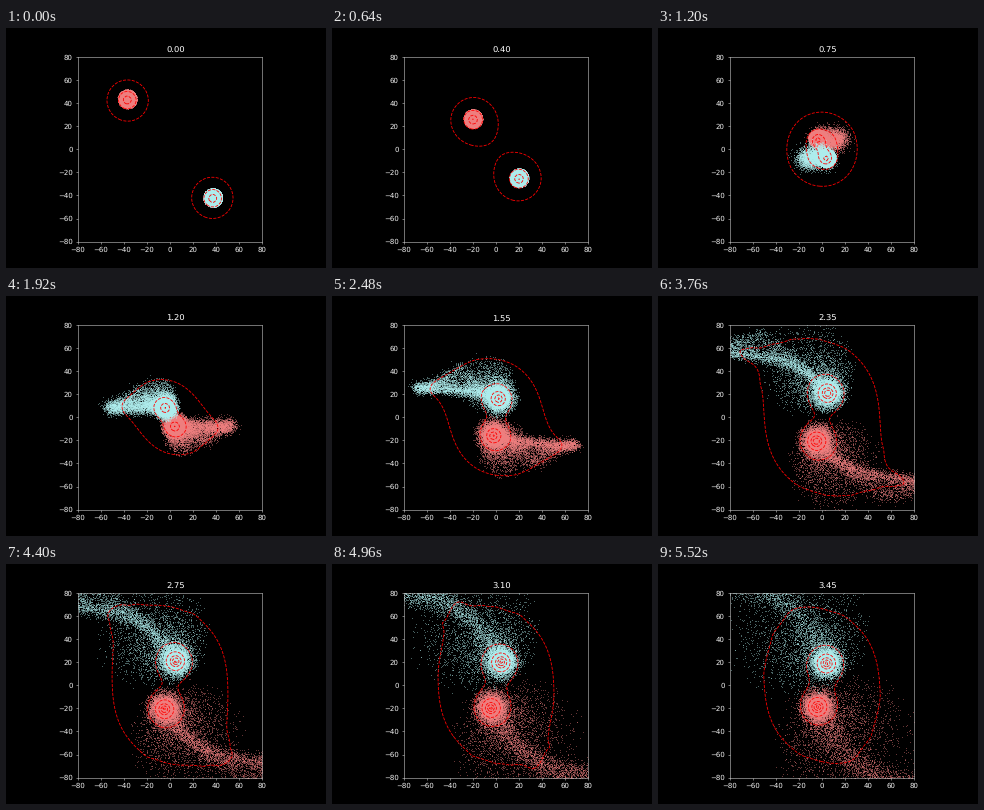
A matplotlib script that plays this animation: 320 px wide and 240 px high, repeating every 5600 ms.

```python
import numpy as np
import matplotlib.pyplot as plt
from matplotlib.animation import FuncAnimation

FRAMES, INTERVAL, DT = 70, 80, 0.05
COUNT = 16000
MEETING = 0.75  # time of the close encounter

# Path of the turquoise core; the coral galaxy mirrors it through the centre.
CORE_T = [0, 0.5, MEETING, 1.05, 1.55, 2.35, 3.45]
CORE = [(37, -42.7), (15.5, -21), (3.8, -8.5), (-4.5, 3.5),
        (2.4, 16), (5, 20.7), (4, 18.9)]


def spline(x, xs, ys):
    """Smooth curve through the points ys at the times xs."""
    xs, ys = np.asarray(xs, float), np.asarray(ys, float)
    slope = np.gradient(ys, xs, axis=0)
    i = np.clip(np.searchsorted(xs, x, side="right") - 1, 0, len(xs) - 2)
    h = xs[i + 1] - xs[i]
    u = (x - xs[i]) / h
    return ((1 + 2 * u) * (1 - u) ** 2 * ys[i] + u * (1 - u) ** 2 * h * slope[i]
            + u ** 2 * (3 - 2 * u) * ys[i + 1] + u ** 2 * (u - 1) * h * slope[i + 1])


def ease(t, start, end):
    u = np.clip((t - start) / (end - start), 0, 1)
    return u * u * (3 - 2 * u)


def polar(r, a):
    return np.column_stack([r * np.cos(a), r * np.sin(a)])


class Galaxy:
    """A spinning disc that sheds a tail, a sheet above it and a wide halo."""

    def __init__(self, seed, sign):
        rng = np.random.default_rng(seed)
        self.sign = sign
        self.radius = 8 * rng.random(COUNT) ** 0.55 + rng.normal(0, 0.3, COUNT)
        self.angle = rng.uniform(0, 2 * np.pi, COUNT)
        self.growth = 1.4 * rng.random(COUNT) ** 3
        self.spin = -220 / (np.abs(self.radius) + 1) ** 1.5
        self.noise = rng.normal(size=(COUNT, 2))
        self.along = rng.random(COUNT)
        self.lift = rng.random(COUNT)
        a, b, c = (int(COUNT * q) for q in (0.5, 0.63, 0.77))
        self.tail, self.wing, self.halo = slice(a, b), slice(b, c), slice(c, COUNT)
        self.free = slice(a, COUNT)

    def stream(self, part, t, core):
        """Curved tail trailing to the left, longer and steeper with time."""
        s = self.along[part]
        d = s * (20 + 65 * (t - MEETING))
        rise = 33 * max(t - 1.25, 0)
        y = rise * (1 - np.exp(-d / 30))
        width = 2.4 + 1.6 * (t - 1.9) ** 2
        return core + np.column_stack([-d, y]) + width * self.noise[part]

    def sheet(self, t, core):
        pos = self.stream(self.wing, t, core)
        peak = 6 + 17 * ease(t, MEETING, 1.5)
        pos[:, 1] += peak * self.lift[self.wing] * np.interp(
            self.along[self.wing], [0.1, 0.46, 0.9], [0, 1, 0])
        return pos

    def cloud(self, t, core):
        part = self.halo
        r = self.along[part] * (8 + 23 * (t - MEETING))
        spread = polar(np.sqrt(self.lift[part]), self.angle[part])
        return core + r[:, None] * (spread + (-0.4, 0.5)) + self.noise[part]

    def positions(self, t):
        core = spline(t, CORE_T, CORE)
        r = self.radius * (1 + self.growth * ease(t, 0.7, 1.7))
        pos = core + polar(r, self.angle + self.spin * t)
        free = ease(t, 0.4, MEETING)
        if free > 0:
            late = max(t, MEETING)
            for part, goal in ((self.tail, self.stream(self.tail, late, core)),
                               (self.wing, self.sheet(late, core)),
                               (self.halo, self.cloud(late, core))):
                pos[part] += free * (goal - pos[part])
        return self.sign * pos


plt.style.use("dark_background")
plt.rcParams.update({"text.hinting": "none", "axes.edgecolor": "0.8",
                     "xtick.color": "0.8", "ytick.color": "0.8",
                     "xtick.labelcolor": "0.95", "ytick.labelcolor": "0.95"})
fig, ax = plt.subplots(figsize=(6.4, 4.8), dpi=50)
ax.set(xlim=(-80, 80), ylim=(-80, 80), aspect="equal")
ticks = range(-80, 81, 20)
ax.set_xticks(ticks)
ax.set_yticks(ticks)
title = ax.set_title("", x=0.529)

galaxies = [Galaxy(3, -1), Galaxy(8, 1)]
dots = [ax.plot([], [], ",", color=c, alpha=0.42, zorder=1)[0]
        for c in ("lightcoral", "paleturquoise")]

axis = np.linspace(-80, 80, 81)
grid_x, grid_y = np.meshgrid(axis, axis)


def pull(points, soft):
    """Mean softened 1/r potential of the points on the grid."""
    total = np.zeros_like(grid_x)
    for x, y in points:
        total += 1 / np.sqrt((grid_x - x) ** 2 + (grid_y - y) ** 2 + soft ** 2)
    return total / len(points)


def draw_contours(t, galaxy, pos):
    for old in list(ax.collections):
        old.remove()
    core = spline(t, CORE_T, CORE)
    phi = 0.5 * pull([core], 3) + 0.5 * pull(pos[galaxy.free][::60], 4)
    phi = phi + phi[::-1, ::-1]
    level = 0.0645
    if t >= MEETING:
        reach = 30 + 20 * ease(t, 0.6, 2.2)
        level = np.interp(reach, axis, phi[len(axis) // 2])
    ax.contour(grid_x, grid_y, phi, levels=level * np.arange(1, 8),
               colors="red", linestyles="dashed", linewidths=1.2, zorder=2)


def update(frame):
    t = frame * DT
    title.set_text(f"{t:.2f}")
    for galaxy, dot in zip(galaxies, dots):
        pos = galaxy.positions(t)
        dot.set_data(*pos.T)
    draw_contours(t, galaxy, pos)
    return []


anim = FuncAnimation(fig, update, frames=FRAMES, interval=INTERVAL,
                     init_func=lambda: [], repeat=True, repeat_delay=0,
                     cache_frame_data=False)
plt.show()
```
